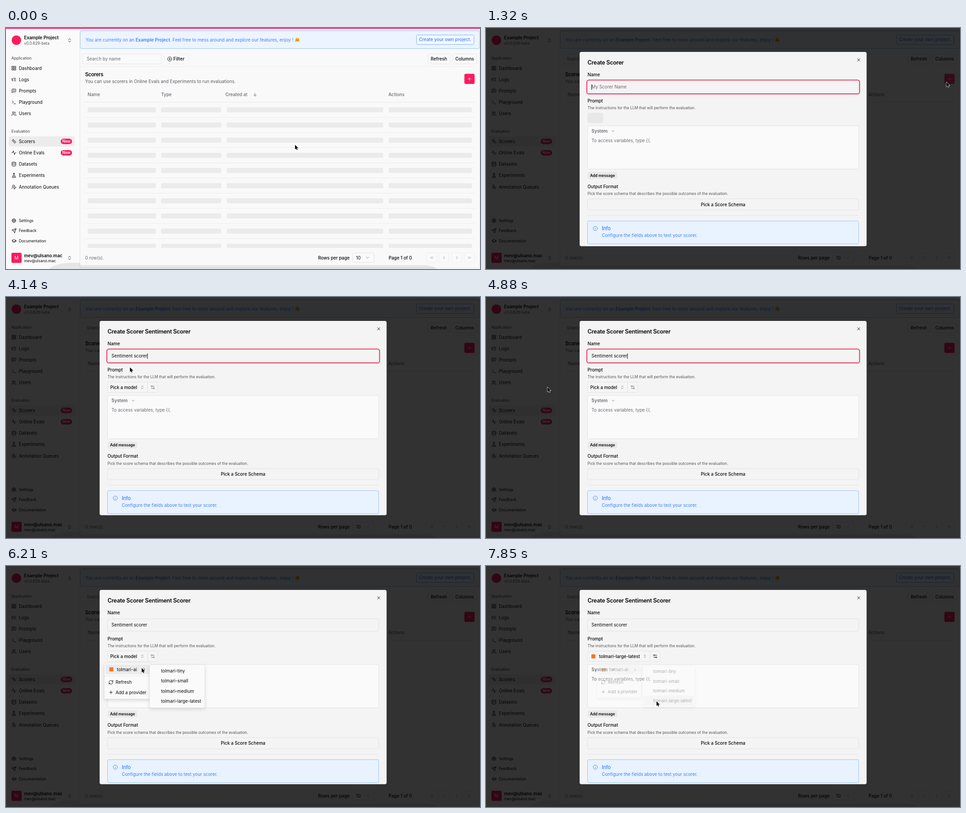
An HTML page for the animation above (7990 ms loop, 1048 by 534 pixels).

```html
<!DOCTYPE html>
<html lang="en">
<head>
<meta charset="utf-8">
<title>Create Scorer</title>
<style>
html, body { margin: 0; width: 100%; height: 100%; overflow: hidden; background: #fafafa; }
svg { display: block; width: 1048px; height: 534px; }
text { font-family: Inter, "Open Sans", sans-serif; white-space: pre; }
</style>
</head>
<body>
<svg id="stage" viewBox="0 0 1048 534" xmlns="http://www.w3.org/2000/svg"></svg>
<script>
const PINK = '#fb1b5f', BLUE = '#3b82f6', SKY = '#93c5fd', INK = '#09090b', GRAY = '#6b6b73', LINE = '#e4e4e6';
const BRAND = 'tolmari', MAIL = 'mev@ulsano.mac', NAME = 'Sentiment scorer';
const LOOP = 7990, TICK = 148;

const ICONS = {
  grid: 'M3 3h7v7H3zM14 3h7v7h-7zM14 14h7v7h-7zM3 14h7v7H3z',
  tree: 'M21 12h-8M21 6H8M21 18h-8M3 6v4c0 1.1.9 2 2 2h3M3 10v6c0 1.1.9 2 2 2h3',
  chat: 'M21 15a2 2 0 0 1-2 2H7l-4 4V5a2 2 0 0 1 2-2h14a2 2 0 0 1 2 2zM10 7l-2 3 2 3M14 7l2 3-2 3',
  term: 'M4 17l6-6-6-6M12 19h8',
  users: 'M16 21v-2a4 4 0 0 0-4-4H6a4 4 0 0 0-4 4v2M22 21v-2a4 4 0 0 0-3-3.9M16 3.100a4 4 0 0 1 0 7.800M13 7a4 4 0 1 1-8 0 4 4 0 0 1 8 0',
  ruler: 'M8 3L3 8l13 13 5-5zM8 9l2-2M11 12l2-2M14 15l2-2',
  pulse: 'M22 12h-4l-3 9L9 3l-3 9H2',
  data: 'M21 5c0 1.700-4 3-9 3S3 6.700 3 5s4-3 9-3 9 1.300 9 3zM3 5v14c0 1.700 4 3 9 3s9-1.300 9-3V5M3 12c0 1.700 4 3 9 3s9-1.300 9-3',
  flask: 'M10 2v7.500L4 20c-.5 1 0 2 1 2h14c1 0 1.500-1 1-2L14 9.500V2M8.500 2h7M7 16h10',
  pen: 'M2 21a8 8 0 0 1 10-7.700M15 8a5 5 0 1 1-10 0 5 5 0 0 1 10 0M21.400 15.600a2 2 0 0 0-3-3L13 18l-1 4 4-1z',
  gear: 'M15 12a3 3 0 1 1-6 0 3 3 0 0 1 6 0M19.500 12a7.500 7.500 0 1 1-15 0 7.500 7.500 0 0 1 15 0M12 1.500v3M12 19.500v3M1.500 12h3M19.500 12h3M4.600 4.600l2 2M17.400 17.400l2 2M4.600 19.400l2-2M17.400 6.600l2-2',
  send: 'M22 2L2 9l9 4 4 9zM22 2L11 13',
  cap: 'M22 10L12 5 2 10l10 5zM6 12v5c3 3 9 3 12 0v-5M22 10v6',
  updown: 'M7 15l5 5 5-5M7 9l5-5 5 5',
  down: 'M6 9l6 6 6-6',
  left: 'M15 18l-6-6 6-6',
  right: 'M9 18l6-6-6-6',
  first: 'M11 17l-5-5 5-5M18 17l-5-5 5-5',
  last: 'M13 17l5-5-5-5M6 17l5-5-5-5',
  plus: 'M5 12h14M12 5v14',
  add: 'M22 12a10 10 0 1 1-20 0 10 10 0 0 1 20 0M8 12h8M12 8v8',
  info: 'M22 12a10 10 0 1 1-20 0 10 10 0 0 1 20 0M12 16v-4M12 8v.01',
  close: 'M18 6L6 18M6 6l12 12',
  arrow: 'M12 5v14M19 12l-7 7-7-7',
  sliders: 'M20 7h-9M14 17H5M20 17a3 3 0 1 1-6 0 3 3 0 0 1 6 0M10 7a3 3 0 1 1-6 0 3 3 0 0 1 6 0',
  sync: 'M3 12a9 9 0 0 1 15-6.700L21 8M21 3v5h-5M21 12a9 9 0 0 1-15 6.700L3 16M3 21v-5h5'
};

const text = (x, y, s, { size = 9.8, w = 400, c = INK, more = '' } = {}) =>
  `<text x="${x}" y="${y}" font-size="${size}" font-weight="${w}" fill="${c}" ${more}>${s}</text>`;
const small = (x, y, s, c = '#52525b') => text(x, y, s, { size: 8.4, c });
const medium = (x, y, s, c = INK) => text(x, y, s, { w: 500, c });
const tight = size => `letter-spacing="${-0.025 * size}"`;
const box = (x1, y1, x2, y2, fill, stroke = 'none', r = 3, more = '') =>
  `<rect x="${x1}" y="${y1}" width="${x2 - x1}" height="${y2 - y1}" rx="${r}" fill="${fill}" stroke="${stroke}" ${more}/>`;
const rule = (x1, x2, y, c = '#e8e8e9') => `<path d="M${x1} ${y}H${x2}" stroke="${c}"/>`;
const icon = (name, x, y, { size = 11.2, c = INK, sw = 2 } = {}) =>
  `<path transform="translate(${x - size / 2} ${y - size / 2}) scale(${size / 24})" d="${ICONS[name]}" fill="none" stroke="${c}" stroke-width="${sw}" stroke-linecap="round" stroke-linejoin="round"/>`;
const group = (id, body, more = '') => `<g id="${id}" ${more}>${body}</g>`;

function sidebar() {
  const nav = (name, label, i, top) => icon(name, 17.5, top + i * 25.2) + text(28.5, top + 3.5 + i * 25.2, label);
  const badge = y => box(121, y - 6, 146, y + 6, PINK, 'none', 6) +
    text(133.5, y + 3, 'New', { size: 8.4, w: 600, c: '#fff', more: 'text-anchor="middle"' });
  const main = [['grid', 'Dashboard'], ['tree', 'Logs'], ['chat', 'Prompts'], ['term', 'Playground'], ['users', 'Users']];
  const evals = [['ruler', 'Scorers'], ['pulse', 'Online Evals'], ['data', 'Datasets'], ['flask', 'Experiments'], ['pen', 'Annotation Queues']];
  const foot = [['gear', 'Settings'], ['send', 'Feedback'], ['cap', 'Documentation']];
  return `<circle cx="23" cy="27" r="10.500" fill="${PINK}"/>` +
    text(40, 25.3, 'Example Project', { w: 600 }) + small(40, 36.6, 'v0.0.629-beta') + icon('updown', 140.5, 27.3) +
    small(12, 69.5, 'Application', '#3f3f46') + main.map(([k, l], i) => nav(k, l, i, 89)).join('') +
    small(12, 232, 'Evaluation', '#3f3f46') + box(6, 240, 152, 262.5, '#ececed', 'none', 4) +
    evals.map(([k, l], i) => nav(k, l, i, 251.2)).join('') + badge(251.2) + badge(276.4) +
    foot.map(([k, l], i) => icon(k, 17.5, 426.8 + i * 22.4) + small(28.5, 429.8 + i * 22.4, l, INK)).join('') +
    box(12, 498, 34.5, 520.5, PINK) + text(23.2, 513, 'M', { c: '#fff', more: 'text-anchor="middle"' }) +
    text(40, 507.5, MAIL, { w: 600 }) + small(40, 518.5, MAIL, INK) + icon('updown', 140.5, 509.5);
}

function emoji(x, y) {
  return `<circle cx="${x}" cy="${y}" r="4.500" fill="#f9bd45"/>` +
    `<path d="M${x - 2} ${y - 1.2}v.6M${x + 2} ${y - 1.2}v.6M${x - 1.8} ${y + 1}q1.800 1.600 3.600 0" stroke="#7a4310" fill="none" stroke-linecap="round" stroke-width=".9"/>` +
    `<circle cx="${x - 3.4}" cy="${y + 2.8}" r="1.600" fill="#ee9b2f"/><circle cx="${x + 3.4}" cy="${y + 2.8}" r="1.600" fill="#ee9b2f"/>`;
}

function page() {
  const cols = [[180.5, 331.5], [343, 476], [488, 834], [846, 1030]];
  let rows = '';
  for (let i = 0; i < 10; i++) {
    const y = 175.7 + i * 33.6;
    rows += cols.map(([a, b]) => box(a, y, b, y + 11.2, '#ebebec')).join('') + rule(175, 1036, y + 22.3, '#ececed');
  }
  const pager = ['first', 'left', 'right', 'last'].map((k, i) => {
    const x = [941, 968, 997, 1024.5][i];
    return box(x - 11, 498, x + 11, 520, '#fafafa', '#eeeeef') + icon(k, x, 509, { c: '#9b9ba2' });
  }).join('');
  return box(163.5, 5.5, 1047.5, 531.5, '#f9f9f9', LINE, 4) +
    box(164, 6, 1047.5, 45.5, '#ecf4ff', SKY, 4) +
    text(176, 29.5, 'You are currently on an <tspan font-weight="600">Example Project</tspan>. Feel free to mess around and explore our features, enjoy !', { c: BLUE }) +
    emoji(644, 26) +
    box(907.5, 15.5, 1034.5, 36.5, '#f3f8ff', '#7db2fb') + medium(913, 29.3, 'Create your own project.', BLUE) +
    box(169.5, 57.5, 344, 79.5, '#fafafa', LINE) + text(178.5, 72.3, 'Search by name', { c: GRAY }) +
    box(350.5, 57.5, 403, 79.5, '#fafafa', '#e9e9ea', 3, 'stroke-dasharray="2 1"') + icon('add', 362, 68.7) +
    text(370, 72.3, 'Filter', { size: 10.2, w: 500 }) +
    box(933.5, 57.5, 981.5, 79.5, '#fafafa', LINE) + medium(939, 72.3, 'Refresh') +
    box(987.5, 57.5, 1040.5, 79.5, '#fafafa', LINE) + medium(993.5, 72.3, 'Columns') +
    rule(164, 1041, 85.5, '#eeeeef') +
    text(175, 106.8, 'Scorers', { size: 11.2, w: 600, more: tight(11.2) }) +
    text(175, 121.8, 'You can use scorers in Online Evals and Experiments to run evaluations.', { c: '#5b5b63' }) +
    box(1013.5, 101.5, 1036, 124, PINK, 'none', 3, 'id="plus"') + icon('plus', 1024.7, 112.7, { c: '#fff', sw: 1.7 }) +
    [[180.5, 'Name'], [343, 'Type'], [485, 'Created at'], [845.5, 'Actions']].map(([x, s]) => medium(x, 151.2, s, GRAY)).join('') +
    icon('arrow', 550.5, 147.8, { c: GRAY }) + rule(175, 1036, 164.5) +
    group('rows', rows, 'clip-path="url(#table)"') +
    group('empty', box(547.5, 180.5, 663.5, 216.5, '#ecf4ff', SKY, 3) + icon('info', 564.5, 197.8, { c: BLUE }) +
      text(578.5, 200.9, 'No results found', { w: 500, c: BLUE, more: tight(9.8) })) +
    text(175, 512.5, '0 row(s).', { c: GRAY }) + medium(690, 512.5, 'Rows per page') +
    box(766.5, 498.5, 814, 519.5, '#fafafa', LINE) + text(774, 512.5, '10') + icon('down', 799.5, 509, { size: 10, c: GRAY }) +
    medium(846, 512.5, 'Page 1 of 0') + pager +
    `<path d="M95 534Q110 520 150 520H164V525.500H925Q945 526 952 534z" opacity=".08"/>` +
    box(0, 0, 1048, 1.7, PINK, 'none', 0, 'id="bar"');
}

const chip = (x, y) => box(x - 4.5, y - 4.5, x + 4.5, y + 4.5, '#f2762a', 'none', 1);

function picker() {
  const wide = (x, hover, body) => box(224.5, 188.5, x, 211.5, hover, LINE) + body + box(x, 188.5, x + 23, 211.5, '#f5f5f5', LINE);
  return group('short', wide(313, '#f5f5f5', medium(230.5, 203.7, 'Pick a model') + icon('updown', 301.3, 200, { size: 9.5, c: GRAY })) +
      icon('sliders', 324.5, 200, { c: GRAY })) +
    group('long', wide(362.5, '#f5f5f5', chip(237.5, 200.3) + medium(250, 203.7, BRAND + '-large-latest') +
      icon('updown', 351, 200, { size: 9.5, c: GRAY })) + icon('sliders', 374, 200));
}

function modal() {
  const lower = box(224.5, 216.5, 824, 312.5, '#fafafa', '#e2e2e4', 3, 'id="editor"') +
    text(233.3, 231.7, 'System', { w: 600, c: GRAY }) + icon('down', 281, 228.3, { size: 10, c: GRAY }) +
    text(233.3, 252.7, 'To access variables, type {{.', { c: GRAY }) +
    box(224.5, 319, 290, 334, '#e9e9ea') + text(230, 329.6, 'Add message', { size: 8.4, w: 600 }) +
    medium(224.5, 354.9, 'Output Format') +
    small(224.5, 370, 'Pick the score schema that describes the possible outcomes of the evaluation.') +
    box(224.5, 378.5, 824, 403.5, '#f4f4f4', '#e2e2e4') +
    text(524.2, 394.7, 'Pick a Score Schema', { w: 500, more: 'text-anchor="middle"' }) +
    rule(224, 824, 415.5, '#e2e2e4') + box(224.5, 427.5, 824, 478.5, '#e9f2ff', SKY) +
    icon('info', 241.7, 444.2, { c: BLUE }) + text(256, 448.3, 'Info', { size: 11.2, w: 500, c: BLUE, more: tight(11.2) }) +
    text(256, 463.4, 'Configure the fields above to test your scorer.', { c: BLUE });
  return box(0, 0, 1048, 534, '#000', 'none', 0, 'opacity=".8"') +
    box(207, 53, 841.5, 483.5, '#f4f4f4', 'none', 4) +
    text(224.5, 81.4, '', { size: 12.6, w: 600, more: 'id="title" ' + tight(12.6) }) + icon('close', 824, 70.6) +
    medium(224.5, 106.7, 'Name') +
    box(222.8, 115.3, 826, 146.2, '#fafafa', '#f0204f', 4.5, 'id="ring" stroke-width="1.7"') +
    box(224.5, 117, 824, 144.5, '#f4f4f4', '#e2e2e4') + text(233.3, 134.4, '', { more: 'id="field"' }) +
    '<path id="caret" stroke="#000"/>' +
    medium(224.5, 164.6, 'Prompt') + small(224.5, 179.8, 'The instructions for the LLM that will perform the evaluation.') +
    group('pending', box(224.5, 188, 259, 210.5, '#e8e8e9')) + group('ready', picker()) + group('lower', lower);
}

function menus() {
  const models = ['tiny', 'small', 'medium', 'large-latest'].map((s, i) => text(342.7, 235.9 + i * 22.4, `${BRAND}-${s}`)).join('');
  return group('menu', box(217.5, 215, 319.5, 294.5, '#fafafa', '#e6e6e7', 3, 'filter="url(#shadow)"') +
      box(220, 218, 317, 240, '#ebebec', 'none', 2, 'id="parent"') + chip(233, 229) +
      text(245.3, 232.6, BRAND + '-ai') + icon('right', 305.5, 229) + rule(218, 319, 243.5) +
      icon('sync', 232, 257.7) + text(242.3, 261.2, 'Refresh') + icon('plus', 232, 280) + text(242.3, 283.6, 'Add a provider')) +
    group('sub', box(317.5, 218.5, 439.5, 314, '#fafafa', '#e6e6e7', 3, 'filter="url(#shadow)"') +
      box(320, 221.3, 436.5, 243.3, '#ebebec', 'none', 2, 'id="pick"') + models);
}

const stage = document.getElementById('stage');
stage.innerHTML = '<defs><clipPath id="table"><path d="M164 165H1048V487H164z"/></clipPath>' +
  '<filter id="shadow" x="-20%" y="-20%" width="140%" height="150%"><feDropShadow dx="0" dy="3" stdDeviation="3.500" flood-opacity=".13"/></filter></defs>' +
  box(0, 0, 1048, 534, '#fafafa', 'none', 0) + sidebar() + page() + group('modal', modal()) + menus() +
  group('cursor', '<path id="arrow" d="M0 0v10l2.300-2.100 1.500 3.400 1.700-.7-1.500-3.300h3.300z"/>' +
    '<path id="hand" d="M-1 0q1-1 2 0v4l5 1.200q1.500.5 1.200 2L6.500 11H1L-3 6.500q0-1.500 2-.5z"/>',
    'fill="#000" stroke="#fff" stroke-width="1.200" paint-order="stroke" stroke-linejoin="round"');

const el = {};
stage.querySelectorAll('[id]').forEach(e => el[e.id] = e);
const show = (id, on) => el[id].style.display = on ? '' : 'none';
const set = (id, key, value) => el[id].setAttribute(key, value);

// Pointer stops: tick, x, y
const STOPS = [[0, 639, 259], [8, 1020, 120], [9, 1018, 120], [12, 274, 156], [30, 274, 156], [33, 136, 200],
  [36, 266, 197], [39, 266, 197], [42, 300, 226], [47, 365, 245], [50, 377, 300], [60, 377, 300]];

function pointer(n) {
  const i = STOPS.findIndex(s => s[0] > n);
  const [a, x0, y0] = STOPS[i - 1], [b, x1, y1] = STOPS[i];
  const k = 0.5 - Math.cos(Math.PI * (n - a) / (b - a)) / 2;
  return [x0 + (x1 - x0) * k, y0 + (y1 - y0) * k];
}

const typed = n => n < 15 ? 0 : n < 17 ? 1 : Math.min(NAME.length, Math.round(2 + (n - 17) * 1.27));
const shrink = (cx, cy, dx) => `translate(${cx + dx} ${cy}) scale(.96) translate(${-cx} ${-cy})`;

function draw(n) {
  const [x, y] = pointer(n);
  const open = n >= 9, ready = n >= 10, focus = n < 34, chosen = n >= 53;

  set('bar', 'opacity', Math.max(0, 1 - n / 2));
  show('rows', n < 3);
  show('empty', n >= 3);
  set('plus', 'fill', n >= 8 && n < 10 ? '#fb3d73' : PINK);

  show('modal', open);
  show('pending', !ready);
  show('ready', ready);
  set('lower', 'transform', `translate(0 ${ready ? 1.5 : 0})`);
  const value = NAME.slice(0, typed(n));
  el.title.textContent = 'Create Scorer ' + value.replace(/\b[a-z]/g, c => c.toUpperCase());
  el.field.textContent = value || 'My Scorer Name';
  set('field', 'fill', value ? INK : GRAY);
  show('ring', focus);
  show('caret', open && focus);
  if (open) set('caret', 'd', `M${233.8 + (value ? el.field.getComputedTextLength() : 0)} 125v12`);
  set('editor', 'stroke', !focus && n < 38 ? '#f43f5e' : '#e2e2e4');

  show('short', !chosen);
  show('long', chosen);
  set('short', 'opacity', 1);
  el.short.firstElementChild.setAttribute('fill', n >= 36 && n < 40 ? '#e9e9ea' : '#f5f5f5');

  show('menu', n >= 38);
  show('sub', n >= 42);
  show('parent', n >= 41);
  show('pick', x > 320);
  const row = Math.max(0, Math.min(3, Math.floor((y - 223) / 22.4)));
  set('pick', 'y', 221.3 + row * 22.4);
  set('menu', 'transform', chosen ? shrink(267.5, 255, 26) : '');
  set('sub', 'transform', chosen ? shrink(378.5, 266.5, 25.5) : '');
  for (const id of ['menu', 'sub']) set(id, 'opacity', chosen ? 0.3 : 1);

  const hand = n >= 36 && n < 40;
  show('hand', hand);
  show('arrow', !hand);
  set('cursor', 'transform', `translate(${x} ${y})`);
}

let last = -1;
function frame() {
  const n = Math.floor((performance.now() % LOOP + 20) / TICK);
  if (n !== last) draw(last = n);
  requestAnimationFrame(frame);
}
frame();
</script>
</body>
</html>
```
